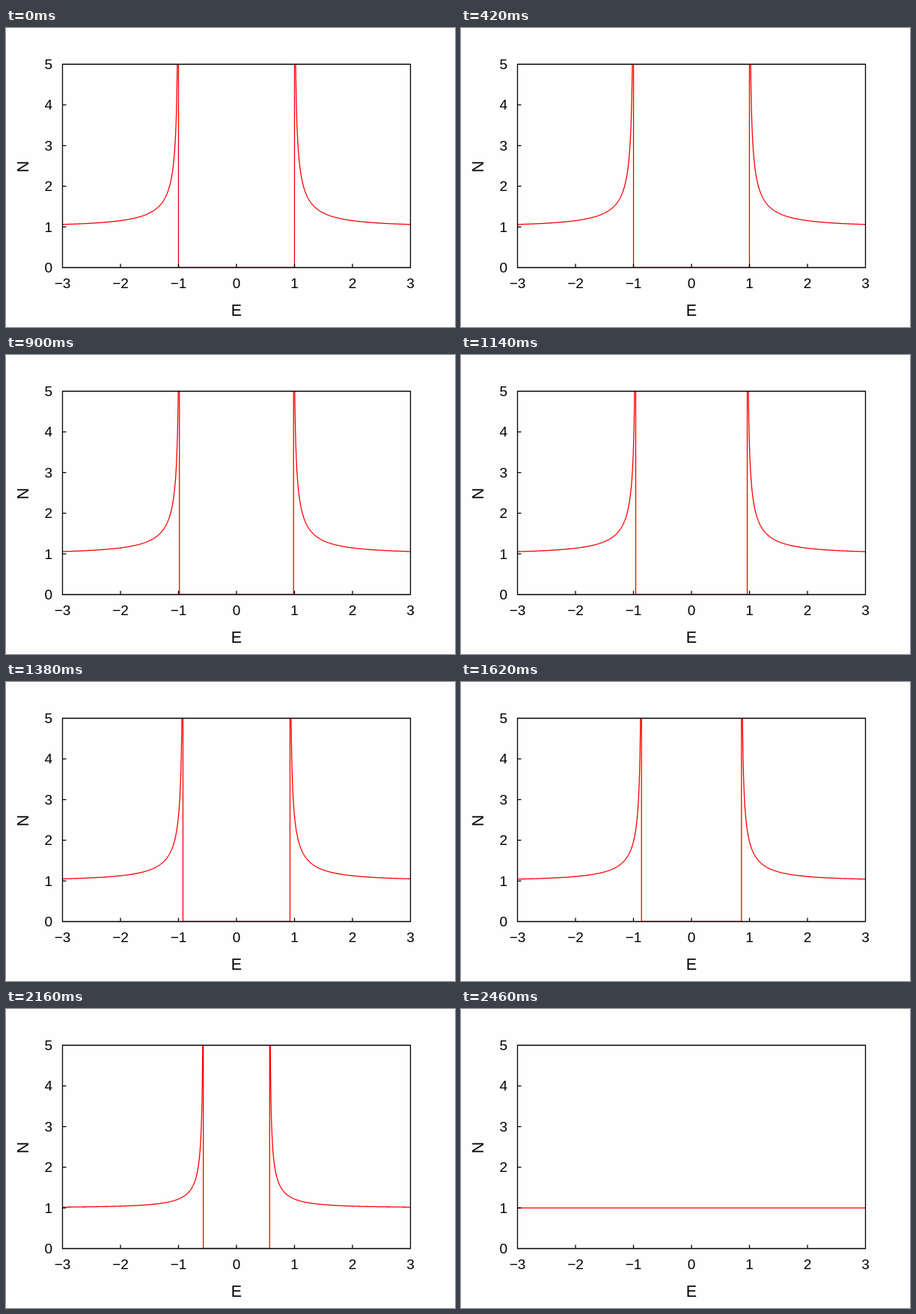
An HTML page with a canvas for the animation above (3050 ms loop, 600 by 400 pixels).

```html
<!DOCTYPE html>
<html lang="en">
<head>
<meta charset="utf-8">
<title>Density of states with a closing gap</title>
<style>
  html, body { margin: 0; width: 100%; height: 100%; overflow: hidden; background: #fefefe; }
  canvas { display: block; }
</style>
</head>
<body>
<canvas id="stage" width="600" height="400"></canvas>
<script>
const ctx = document.getElementById('stage').getContext('2d');
const LOOP = 3050, STEP = 60, LAST = 41, CRITICAL = 40.7;
const box = { x: 75.5, y: 48.5, w: 465, h: 272 };
const px = e => box.x + (e + 3) * box.w / 6;
const py = n => box.y + box.h * (1 - n / 5);

// Gap relative to its zero-temperature value
function gapAt(step) {
  const t = step / CRITICAL;
  return Math.tanh(1.82 * Math.max(0, 1.018 * (1 / t - 1)) ** 0.51);
}

// With E = gap * cosh(u), the density E / sqrt(E² - gap²) is coth(u)
function drawBranch(side, gap) {
  const uMax = Math.acosh(3 / gap), uMin = 0.02, count = 300;
  for (let i = 0; i <= count; i++) {
    const u = uMax + (uMin - uMax) * i / count;
    ctx.lineTo(px(side * gap * Math.cosh(u)), py(1 / Math.tanh(u)));
  }
  ctx.lineTo(px(side * gap), py(0));
}

function drawCurve(gap) {
  ctx.save();
  ctx.beginPath();
  ctx.rect(box.x, box.y, box.w, box.h);
  ctx.clip();
  ctx.strokeStyle = '#f00';
  ctx.lineWidth = 1.3;
  ctx.lineJoin = 'bevel';
  ctx.beginPath();
  if (gap > 0) {
    drawBranch(-1, gap);
    ctx.lineTo(px(gap), py(0));
    ctx.stroke();
    ctx.beginPath();
    drawBranch(1, gap);
  } else {
    ctx.moveTo(px(-3), py(1));
    ctx.lineTo(px(3), py(1));
  }
  ctx.stroke();
  ctx.restore();
}

function label(text, x, y, size, align) {
  ctx.font = `${size}px "Liberation Sans", Arial, sans-serif`;
  ctx.textAlign = align;
  ctx.fillText(text, x, y);
}

function drawAxes() {
  ctx.strokeStyle = ctx.fillStyle = '#000';
  ctx.lineWidth = 1.3;
  ctx.beginPath();
  ctx.rect(box.x, box.y, box.w, box.h);
  for (let e = -3; e <= 3; e++) {
    ctx.moveTo(px(e), py(0));
    ctx.lineTo(px(e), py(0) - 5);
    label(String(e).replace('-', '\u2212'), px(e), 348, 19, 'center');
  }
  for (let n = 0; n <= 5; n++) {
    ctx.moveTo(box.x, py(n));
    ctx.lineTo(box.x + 5, py(n));
    label(n, 62, py(n) + 6.5, 19, 'right');
  }
  ctx.stroke();
  label('E', 308, 385, 21.5, 'center');
  ctx.save();
  ctx.translate(30, 185.5);
  ctx.rotate(-Math.PI / 2);
  label('N', 0, 0, 21.5, 'center');
  ctx.restore();
}

function draw() {
  const step = Math.min(LAST, Math.floor(performance.now() % LOOP / STEP));
  ctx.fillStyle = '#fefefe';
  ctx.fillRect(0, 0, 600, 400);
  drawCurve(gapAt(step));
  drawAxes();
  requestAnimationFrame(draw);
}
draw();
</script>
</body>
</html>
```
